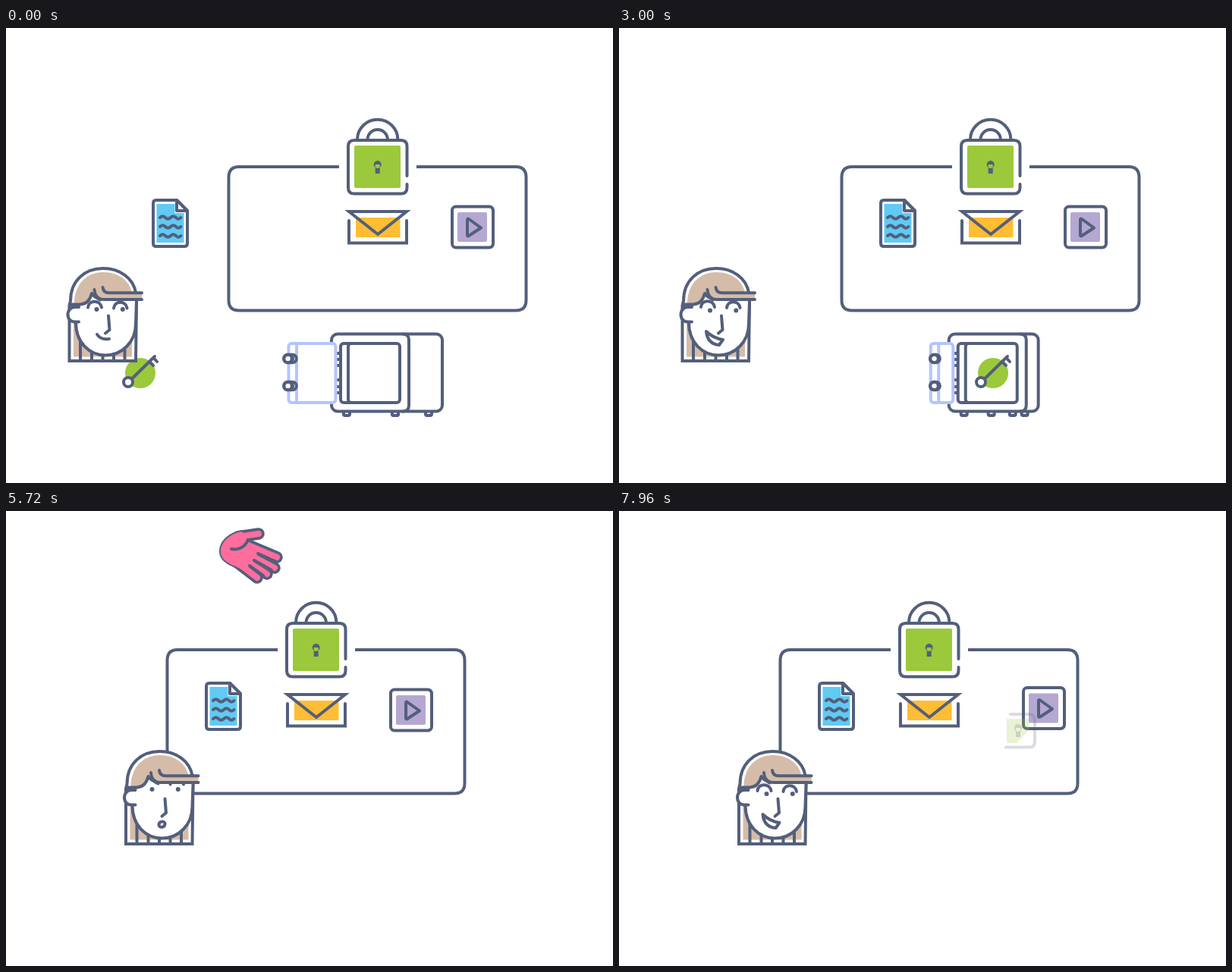
These frames come from a looping animation (800x600 px, 8 s). An HTML page with a canvas:

```html
<!DOCTYPE html>
<html lang="en">
<head>
<meta charset="utf-8">
<title>Safe keeping</title>
<style>
  html, body { margin: 0; height: 100%; overflow: hidden; background: #fff; }
  canvas { display: block; width: 800px; height: 600px; }
</style>
</head>
<body>
<canvas id="stage" width="800" height="600"></canvas>
<script>
const ctx = document.getElementById('stage').getContext('2d');
const LOOP = 8000;
const INK = '#535f7b', GREEN = '#9bc93b', BLUE = '#60caf4', ORANGE = '#ffbd34',
      PURPLE = '#b4a8d2', PINK = '#ff6d9d', HAIR = '#d5bca8', DOOR = '#b4c4ff', WHITE = '#fff';

// Timing
const clamp = (v, a = 0, b = 1) => Math.min(b, Math.max(a, v));
const lerp = (a, b, p) => a + (b - a) * p;
const span = (t, from, to) => clamp((t - from) / (to - from));
const inOut = p => p < .5 ? 4 * p ** 3 : 1 - 4 * (1 - p) ** 3;
const swoosh = p => 1 - (1 - p * p) ** 3;
const ease = (t, from, to) => inOut(span(t, from, to));

// Keys are [time, [values]]; neighbours are blended.
function track(t, keys) {
  let i = keys.findIndex(k => k[0] > t);
  if (i < 0) return keys.at(-1)[1];
  if (i === 0) return keys[0][1];
  const [t0, a] = keys[i - 1], [t1, b] = keys[i];
  const p = ease(t, t0, t1);
  return a.map((v, n) => lerp(v, b[n], p));
}

// Drawing
function fill(path, color) {
  ctx.fillStyle = color;
  ctx.fill(new Path2D(path));
}
function line(path, color = INK, width = 4) {
  ctx.strokeStyle = color;
  ctx.lineWidth = width;
  ctx.stroke(new Path2D(path));
}
function shape(path, color = WHITE, stroke = INK) {
  fill(path, color);
  line(path, stroke);
}
const box = (x, y, w, h, r = 0) =>
  `M${x + r} ${y}h${w - 2 * r}a${r} ${r} 0 0 1 ${r} ${r}v${h - 2 * r}a${r} ${r} 0 0 1 ${-r} ${r}` +
  `h${2 * r - w}a${r} ${r} 0 0 1 ${-r} ${-r}v${2 * r - h}a${r} ${r} 0 0 1 ${r} ${-r}z`;
const disc = (x, y, r) =>
  `M${x - r} ${y}a${r} ${r} 0 1 0 ${2 * r} 0a${r} ${r} 0 1 0 ${-2 * r} 0z`;
function at(x, y, draw) {
  ctx.save();
  ctx.translate(x, y);
  draw();
  ctx.restore();
}

function drawDome(t) {
  const outer = 171 * (1 - (1 - span(t, 6040, 6480)) ** 3);
  const hole = lerp(30, 171, ease(t, 6300, 7240));
  if (outer < 1 || hole > 170) return;
  const x = 409, y = 176;
  fill(disc(x, y, outer), '#b8dc78');
  fill(disc(x, y, Math.max(0, outer - 5)), '#a7d051');
  if (hole < outer) {
    fill(disc(x, y, hole), '#b8dc78');
    fill(disc(x, y, Math.max(0, hole - 5)), WHITE);
  }
}

function drawCard(t) {
  const gap = ease(t, 900, 1400) - ease(t, 2560, 2920);
  fill(box(293.5, 183, 392, 189.5, 13), WHITE);
  fill('M439 186V160C439 146 446 138 454 135A38 38 0 0 1 526 135C534 138 541 146 541 160V186z', WHITE);
  ctx.lineCap = 'butt';
  line(`M439 183H307Q293.5 183 293.5 197V${257 - 45 * gap}` +
       `M293.5 ${257 + 44 * gap}V359Q293.5 372.5 307 372.5H672Q685.5 372.5 685.5 359V197Q685.5 183 672 183H541`);
  ctx.lineCap = 'round';
  if (gap > 0) line(`M293.5 200V${257 - 46 * gap}M293.5 ${257 + 45 * gap}V350`);
}

function drawLock() {
  line('M463 147a26.7 26.2 0 0 1 53.4 0M476.500 147a13.200 13 0 0 1 26.400 0');
  fill(box(451, 148, 77.500, 70.500, 8), WHITE);
  line('M528.500 195V156Q528.500 148 520.500 148H459Q451 148 451 156V210.500Q451 218.500 459 218.500H520.500Q528.500 218.500 528.500 210.500V206');
  fill(box(459, 155, 61, 56, 2), GREEN);
  drawKeyhole(489.7, 180);
}

function drawKeyhole(x, y) {
  fill(disc(x, y, 5) + box(x - 3, y, 6, 12), INK);
}

function drawDocument() {
  shape('M194 231Q194 227 198 227H225L239 241V284Q239 288 235 288H198Q194 288 194 284z');
  fill('M198.500 232H222.500V244H234.500V283H198.500z', BLUE);
  shape('M225 227V241H239z');
  for (const y of [250, 262, 274])
    line(`M203 ${y}q3.500 -3.500 7 0t7 0 7 0 6.500 0`);
}

function drawMail() {
  fill(box(461, 250, 58.500, 26), ORANGE);
  ctx.lineJoin = 'miter';
  line('M452 254V283.500H528V254');
  line('M452 242H528L490 272z');
  ctx.lineJoin = 'round';
}

function drawPlayer() {
  shape(box(588, 235.500, 54, 54, 5));
  fill(box(595, 243, 39, 39, 2), PURPLE);
  line('M608 252.500V273.500Q608 275 610 274L626 263.500L610 252Q608 251 608 252.500z');
}

function drawGhostLock(t) {
  ctx.save();
  ctx.globalAlpha = .22 * span(t, 7720, 7960);
  line('M516 268H540Q548 268 548 276V304Q548 311.500 541 311.500H510');
  fill('M511 274H541V288L524 306H511z', GREEN);
  drawKeyhole(526, 286);
  ctx.restore();
}

function drawSpeedLines(t) {
  const head = ease(t, 1080, 1700), tail = ease(t, 1840, 2320);
  if (head <= tail) return;
  for (const [x, y, w] of [[244, 249, 36], [215, 263, 71], [241, 276, 8], [263, 276, 28]])
    line(`M${x + w * tail} ${y}H${x + w * head}`);
}

function drawHand(t) {
  if (t < 5080 || t > 6740) return;
  const [x, y, angle] = track(t, [
    [5120, [4, -110, 0]], [5480, [6, -8, 0]], [5720, [0, 0, 0]], [5960, [16, 14, 4]],
    [6240, [16, 14, 4]], [6480, [-8, -16, -9]], [6560, [-9, -22, -10]], [6720, [-16, -120, -14]]]);
  ctx.save();
  ctx.translate(300 + x, 55 + y);
  ctx.rotate(angle * Math.PI / 180);
  ctx.translate(-300, -55);
  const fingers = 'M312 42L357 61M312 53L354 75M308 60L344 83M300 64L331 88';
  const thumb = 'M306 34L333 30';
  const palm = 'M311 27C297 29 283 40 283 53C283 62 289 66 296 70L315 79L321 72L327 65L332 56L319 39z';
  line(fingers + thumb, INK, 15.500);
  line(palm);
  line(fingers, PINK, 8);
  line(thumb, PINK, 8);
  fill(palm, PINK);
  line('M319 38C315 48 306 52 297 50M332 56L354 66M327 65L350 78M321 72L339 85');
  ctx.restore();
}

function drawDoor(hinge, width, turn) {
  const free = hinge - width, left = Math.min(hinge, free);
  shape(box(left, 416, Math.abs(width), 78, Math.min(4, Math.abs(width) / 2)), WHITE, DOOR);
  if (Math.abs(width) > 14) line(`M${free + 10.500 * Math.sign(width)} 416v78`, DOOR);
  const knob = free + (9 * turn - 1) * clamp(width / 30, -1, 1);
  for (const y of [436, 472]) {
    shape(box(knob - 5.300, y - 5.300, 10.600 + 6 * (1 - turn), 10.600, 5.300));
    line(disc(knob, y, 5.300));
    if (turn < .4) line(`M${knob + 5} ${y - 4}q3 4 0 8`);
  }
}

function drawSafe(t, move) {
  const leave = span(t, 3440, 4140);
  if (leave === 1) return;
  const turn = ease(t, 2560, 3360);
  const x = 429 + 9 * turn, side = 44 * (1 - turn);
  const doorWidth = lerp(62, -82, span(t, 2560, 3360) ** 2.5);
  const door = () => drawDoor(x + 5.500, doorWidth, turn);

  ctx.save();
  ctx.translate(489, 455 - 130 * leave * leave * (2.7 * leave - 1.7));
  ctx.scale(1 - leave ** 3, 1 - leave ** 3);
  ctx.translate(-489, -455);
  for (const foot of [x + 20, x + 84, x + 40 + side, x + 84 + side])
    line(`M${foot - 4} 506v3q0 2 2 2h4q2 0 2 -2v-3`);
  shape(box(x, 403.500, 102 + side, 102, 8));
  line(`M${x + 94} 403.500q8 0 8 8v86q0 8 -8 8`);
  for (const y of [429, 437, 445, 464, 473, 481]) line(`M${x + 6} ${y}h5`);
  shape(box(x + 12, 416, 78, 78, 4));
  line(`M${x + 26} 416q-4 0 -4 4v70q0 4 4 4`);
  if (doorWidth > 0) door();
  if (t > 2400) drawKey(move);
  if (doorWidth <= 0) door();
  ctx.restore();
}

function drawTrail(t, move) {
  const start = lerp(198, 455, ease(t, 1720, 2360));
  const end = Math.min(455, 155 + 316 * move);
  if (end <= start) return;
  ctx.setLineDash([14.300, 11.800]);
  ctx.lineDashOffset = 13 + start - 198;
  line(`M${start} 452.500H${end}`, GREEN);
  ctx.setLineDash([]);
}

function drawKey(move) {
  at(316 * move, 0, () => {
    fill(disc(177, 455, 20), GREEN);
    line('M166 462.500L196 433M189 440L194 445M194.500 435L199 440');
    shape(disc(161, 467, 6));
  });
}

// Mouths: corner, lower curve, edge, upper curve back to the corner.
const GRIN = [120, 404, 123, 409, 129, 411, 136, 410, 136, 410, 129, 411, 123, 409];
const SMILE = [117, 406, 119, 411, 125, 413, 133, 413, 133, 413, 125, 413, 119, 411];
const LAUGH = [115, 400, 116, 411, 121, 417, 132, 418, 137, 411, 130, 410, 122, 407];
const GASP = [127, 414, 127, 418, 134, 418, 135, 413, 135, 412, 134, 408, 127, 409];
const FROWN = [126, 412, 128, 410.5, 133, 410, 135.5, 411.5, 135.5, 411, 134, 408, 128, 408];

// Brow lift, eye x, eye y, mouth
const MOODS = [
  [80, [0, 119.5, 371, ...GRIN]], [640, [3, 120, 371, ...SMILE]],
  [960, [3, 120, 371, ...SMILE]], [1400, [6.5, 121, 371, ...SMILE]],
  [2560, [6.5, 121, 371, ...SMILE]], [2920, [.5, 120, 372.5, ...LAUGH]],
  [3600, [.5, 120, 372.5, ...LAUGH]], [4100, [-.5, 118, 374, ...LAUGH]],
  [5080, [-.5, 118, 374, ...LAUGH]], [5480, [9, 118, 367, ...GASP]],
  [6240, [9, 118, 367, ...GASP]], [6520, [9, 120, 370, ...FROWN]],
  [6840, [9, 120, 370, ...FROWN]], [7240, [-.5, 120, 373, ...LAUGH]]];

function drawHead(t) {
  const [lift, eyeX, eyeY, ...m] = track(t, MOODS);
  ctx.lineJoin = 'miter';
  shape('M83.500 439V366L85 360C85 333 104 317 128 317C150 317 168 330 171 349L172 358L171 439z');
  ctx.lineJoin = 'round';
  fill(box(89, 380, 77, 53.500), HAIR);
  line('M98 405V439M113 420V439M127.500 425V439M142 425V439M156.500 415V439');

  fill('M92 364V390C92 415 110 431.500 131 431.500C153 431.500 171 414 171 390L172 358H112z', WHITE);
  line('M92 388C92 415 110 431.500 131 431.500C153 431.500 171 414 171 390L172 360');
  shape('M96 368H92C78 367 78 389 92 387.500H96');

  at(0, -lift, () => line('M108 368.500C109 358 124 358 126 368.500M142 369.500C143 359 158 359 159.500 369.500'));
  fill(disc(eyeX, eyeY, 3) + disc(eyeX + 34.300, eyeY, 3), INK);
  line('M135 379.500L136.500 398L131 402.500');
  shape(`M${m[0]} ${m[1]}C${m.slice(2, 8)}L${m[8]} ${m[9]}C${m.slice(10)} ${m[0]} ${m[1]}z`);

  fill('M90 364C90 338 106 322 128 322C148 322 163 333 166 349H179V358H128C122 358 118 354 115 350C111 358 107 364 98 364z', HAIR);
  line('M84.500 364.500H98C106 364 111 358 113 350C115 354 119 355 124 358.500M85 366H96');
  line('M116.500 345C117 353 121 358 130 358H179M127.500 342C128 347 131 349.300 136 349.300H179');
}

function draw(t) {
  const move = swoosh(span(t, 850, 2030));
  const cardX = -81 * ease(t, 4240, 4910);
  const [headX] = track(t, [[4240, [0]], [4620, [-25.5]], [5040, [74.5]]]);
  const nudge = ease(t, 7580, 7900);

  ctx.fillStyle = WHITE;
  ctx.fillRect(0, 0, 800, 600);
  ctx.lineCap = ctx.lineJoin = 'round';
  drawDome(t);
  at(cardX, 0, () => {
    drawCard(t);
    drawLock();
    drawMail();
    at(26 * nudge, -2.5 * nudge, drawPlayer);
    drawSpeedLines(t);
    at(151 * move, 0, drawDocument);
  });
  if (t > 7720) drawGhostLock(t);
  drawHand(t);
  drawSafe(t, move);
  drawTrail(t, move);
  if (t <= 2400) drawKey(move);
  at(headX, 0, () => drawHead(t));
}

function frame() {
  draw(performance.now() % LOOP);
  requestAnimationFrame(frame);
}
frame();
</script>
</body>
</html>
```
